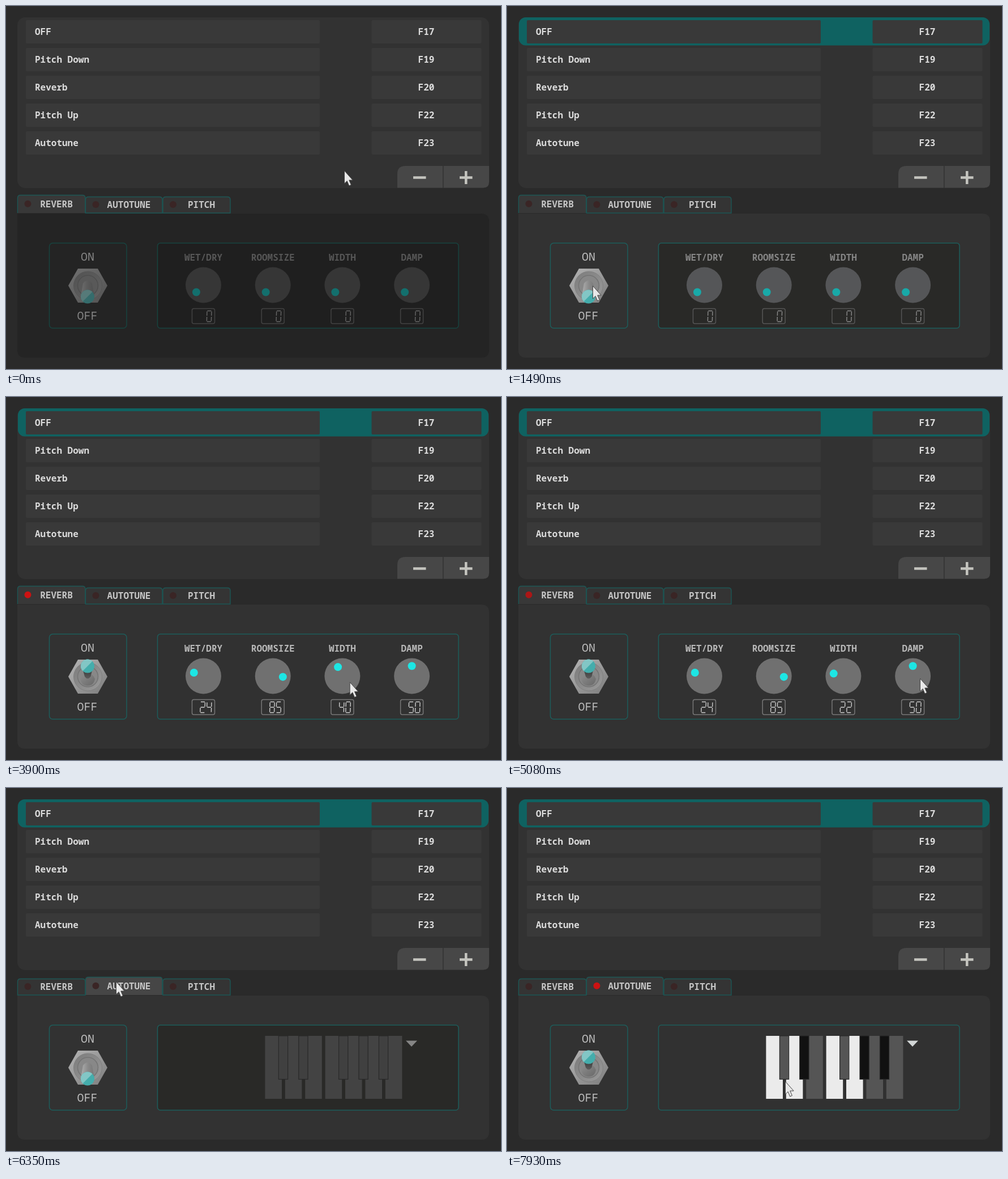
An HTML page for the animation above (8 s loop, 874 px wide and 640 px high).

```html
<!DOCTYPE html>
<html lang="en">
<head>
<meta charset="utf-8">
<title>Voice effects panel</title>
<style>
html, body { margin: 0; width: 100%; height: 100%; overflow: hidden; background: #2a2a2a; }
svg { display: block; width: 874px; height: 640px; font: 600 16px "Noto Sans Mono", "DejaVu Sans Mono", monospace; }
.dim  { --panel: #242424; --box: #1f1f1f; --line: #17433f; --label: #565656; --knob: #363636; --dot: #136f6d; --digit: #686868; --frame: #424242; --switch: #858585; --fade: .53; }
.idle { --panel: #323232; --box: #292927; --line: #1d5d5b; --label: #858585; --knob: #555658; --dot: #18a9a8; --digit: #8c8c8c; --frame: #555; --switch: #bdbdbd; --fade: 1; }
.on   { --panel: #323232; --box: #313131; --line: #1d5d5b; --label: #b8b8b8; --knob: #707070; --dot: #1de6e4; --digit: #d0d0d0; --frame: #777; --switch: #bdbdbd; --fade: 1; }
.panel { fill: var(--panel); }
.box { fill: var(--box); stroke: var(--line); stroke-width: 1.5; }
.switchBox { fill: var(--panel); }
.label { fill: var(--label); }
.knob { fill: var(--knob); }
.dot { fill: var(--dot); }
.digits { fill: none; stroke: var(--digit); stroke-width: 1.4; }
.frame { fill: none; stroke: var(--frame); stroke-width: 1.5; }
.big { font-size: 20px; font-weight: 500; fill: var(--switch); }
.toggle { opacity: var(--fade); }
.row { fill: #dcdcdc; }
.tabText { fill: #c6c6c6; }
</style>
</head>
<body>
<script>
const LOOP = 8000;
const NS = "http://www.w3.org/2000/svg";

function add(parent, tag, attrs = {}, text) {
  const el = document.createElementNS(NS, tag);
  set(el, attrs);
  if (text !== undefined) el.textContent = text;
  parent.append(el);
  return el;
}
function set(el, attrs) {
  for (const key in attrs) el.setAttribute(key, attrs[key]);
}
const rect = (parent, x, y, width, height, rx, attrs) =>
  add(parent, "rect", { x, y, width, height, rx, ...attrs });
const circle = (parent, cx, cy, r, attrs) => add(parent, "circle", { cx, cy, r, ...attrs });
const path = (parent, d, attrs) => add(parent, "path", { d, ...attrs });
const label = (parent, x, y, text, cls, anchor = "middle") =>
  add(parent, "text", { x, y, class: cls, "text-anchor": anchor }, text);
const show = (el, visible) => set(el, { visibility: visible ? "visible" : "hidden" });

const svg = add(document.body, "svg", { viewBox: "0 0 874 640" });
const defs = add(svg, "defs");
function gradient(id, x2, y2, ...colors) {
  const g = add(defs, "linearGradient", { id, x1: 0, y1: 0, x2, y2 });
  colors.forEach((c, i) => add(g, "stop", { offset: i / (colors.length - 1), "stop-color": c }));
}
gradient("nut", 1, 1, "#b4b4b4", "#999", "#7c7c7c");
gradient("ring", 1, 1, "#7c7c7c", "#9a9a9a");
gradient("stem", 1, 0, "#b0b0b0", "#8b8b8b", "#777");
gradient("neck", 0, 1, "#3c3c3c", "#5c5c5c");
gradient("dome", 1, 1, "#8e8e8e", "#686868");

// Preset list
rect(svg, 20, 20, 833, 301, 14, { fill: "#323232" });
const highlight = rect(svg, 21, 20, 831, 49.5, 12, { fill: "#0f6261" });
[["OFF", "F17"], ["Pitch Down", "F19"], ["Reverb", "F20"], ["Pitch Up", "F22"], ["Autotune", "F23"]]
  .forEach(([name, key], i) => {
    const y = 25 + 49 * i;
    rect(svg, 35, y, 519, 41, 2, { fill: "#393939" });
    rect(svg, 645.5, y, 194, 41, 2, { fill: "#393939" });
    label(svg, 51, y + 25.5, name, "row", "start");
    label(svg, 742, y + 25.5, key, "row");
  });
path(svg, "M691 320.500V296q0-14 14-14h66v38.500z", { fill: "#474747" });
path(svg, "M772.500 282H853v28q0 10.500-10 10.500h-70.500z", { fill: "#474747" });
path(svg, "M719 302.500h22.500M801 302.500h22.500M812.200 291v23", { stroke: "#c4c4be", "stroke-width": 4.5 });

// Effect panel
path(svg, "M20 366H839q14 0 14 14v226q0 14-14 14H34q-14 0-14-14z", { class: "panel" });
const tabs = [["REVERB", 20.5, 140, 89], ["AUTOTUNE", 140.5, 276, 217], ["PITCH", 277, 396, 345]]
  .map(([name, left, right, mid]) => {
    const shape = path(svg, "", { stroke: "#1c5755", "stroke-width": 1.4 });
    const led = circle(svg, left + 18, 349, 6);
    const text = label(svg, mid, 0, name, "tabText");
    return { left, right, shape, led, text };
  });

function drawTab(tab, selected, fill, ledColor) {
  const top = selected ? 333.5 : 336.5;
  const { left, right } = tab;
  set(tab.shape, {
    d: `M${left} 365V${top + 5}q0-5 5-5H${right - 5}q5 0 5 5V365${selected ? "" : "z"}`, fill
  });
  set(tab.led, { cy: selected ? 348.7 : 350, fill: ledColor });
  set(tab.text, { y: selected ? 355 : 356 });
}

// Toggle switch
rect(svg, 76.5, 418, 136.5, 150, 6, { class: "box switchBox" });
label(svg, 144, 449, "ON", "big");
label(svg, 143.5, 552.5, "OFF", "big");
const toggle = add(svg, "g", { class: "toggle" });
path(toggle, "M110 493L127 463H162L179 493 162 523H127z", { fill: "url(#nut)" });
circle(toggle, 144.5, 493, 25, { fill: "url(#ring)", stroke: "#808080" });
circle(toggle, 144.5, 493, 18, { fill: "#888", stroke: "#747474", "stroke-width": 1.5 });
function lever(cy, ...parts) {
  const g = add(toggle, "g");
  parts.forEach(([d, fill]) => path(g, d, { fill }));
  circle(g, 144, cy, 12, { fill: "#44adac" });
  path(g, `M135.5 ${cy + 8.5}A12 12 0 0 1 152.5 ${cy - 8.5}z`, { fill: "#83c6c5" });
  return g;
}
const leverDown = lever(512.5, ["M132 512L136 489Q144 479 152 489L156 512z", "url(#stem)"]);
const leverUp = lever(474.5,
  ["M131 497Q134 488 144 488T157 497Q155 509 144 509T131 497z", "url(#dome)"],
  ["M136 482L139 493Q144 500 149.5 493L152 482z", "url(#neck)"]);

// Reverb knobs
rect(svg, 267.5, 418, 531.5, 150, 5, { class: "box" });
const reverb = add(svg, "g");
const knobs = ["WET/DRY", "ROOMSIZE", "WIDTH", "DAMP"].map((name, i) => {
  const x = 348.5 + 122.7 * i;
  label(reverb, x, 449, name, "label");
  circle(reverb, x, 492, 31.5, { class: "knob" });
  rect(reverb, x - 20, 533.5, 40, 26.5, 3, { class: "frame" });
  return {
    x,
    dot: circle(reverb, 0, 0, 7, { class: "dot" }),
    digits: path(reverb, "", { class: "digits", transform: `translate(${x - 5.5} 537.5) skewX(-2)` })
  };
});

const SEGMENTS = {
  a: [1, 0, 8, 0], b: [8.5, 1, 8.5, 8.5], c: [8.5, 10.5, 8.5, 18], d: [1, 19, 8, 19],
  e: [.5, 10.5, .5, 18], f: [.5, 1, .5, 8.5], g: [1, 9.5, 8, 9.5]
};
const DIGITS = ["abcdef", "bc", "abged", "abgcd", "fgbc", "afgcd", "afgedc", "abc", "abcdefg", "abcdfg"];

function digitPath(value) {
  const chars = [...String(value)];
  return chars.map((ch, i) => [...DIGITS[ch]].map(s => {
    const [x1, y1, x2, y2] = SEGMENTS[s];
    const dx = 11.5 * (i + 2 - chars.length);
    return `M${x1 + dx} ${y1}L${x2 + dx} ${y2}`;
  }).join("")).join("");
}
function drawKnob(knob, value) {
  const angle = (value * 2.7 - 135) * Math.PI / 180;
  set(knob.dot, { cx: knob.x + 17.7 * Math.sin(angle), cy: 492 - 17.7 * Math.cos(angle) });
  set(knob.digits, { d: digitPath(Math.round(value)) });
}

// Autotune keyboard
const piano = add(svg, "g");
const keys = [];
for (let i = 0; i < 7; i++) {
  const el = rect(piano, 457.4 + 35.4 * i, 437, 29.6, 111, 0);
  keys.push({ el, off: "#434343", on: [0, 1, 3, 4].includes(i) ? "#ebebeb" : "#555" });
}
for (const i of [0, 1, 3, 4, 5]) {
  const el = rect(piano, 481.4 + 35.4 * i, 437, 16.2, 76.5, 0, { stroke: "#292929", "stroke-width": 1.2 });
  keys.push({ el, off: "#404040", on: [1, 4, 5].includes(i) ? "#111" : "#555" });
}
const arrow = path(piano, "M706 445.500H726L716 456z");

const cursor = path(svg, "M.5 .5V23L5.2 18.500 8.800 27 12.400 25.300 8.800 17H15.200z",
  { fill: "#e8e8e8", stroke: "#444", "stroke-width": 1, "stroke-linejoin": "round" });

// Motion tables: [time, ...values]
const CURSOR = [
  [100, 597, 290], [450, 601, 39], [890, 601, 39], [1490, 151, 493], [1800, 151, 493],
  [2060, 352, 492], [2380, 352, 518], [2600, 474, 493], [2670, 474, 493], [3080, 474, 455],
  [3340, 607, 492], [3410, 607, 492], [4650, 606, 522], [4800, 606, 522], [5080, 729, 496],
  [5140, 729, 496], [5460, 729, 474], [5800, 151, 498], [5900, 151, 498], [6230, 194, 341],
  [6390, 194, 341], [6730, 150, 500], [6960, 150, 500], [7500, 474, 520], [7650, 474, 520], [7900, 491, 517]
];
const VALUES = [
  [[2080, 50], [2380, 24]],
  [[2670, 50], [3080, 85]],
  [[3410, 50], [4650, 22]],
  [[5140, 50], [5460, 70]]
];
const CLICK = { preset: 500, reverbOn: 1720, reverbOff: 5850, autotuneTab: 6260, autotuneOn: 6800 };

function sample(steps, t) {
  const next = steps.findIndex(s => s[0] > t);
  if (next === 0) return steps[0].slice(1);
  if (next < 0) return steps[steps.length - 1].slice(1);
  const a = steps[next - 1], b = steps[next];
  const p = (t - a[0]) / (b[0] - a[0]);
  const eased = p * p * (3 - 2 * p);
  return a.slice(1).map((v, i) => v + (b[i + 1] - v) * eased);
}

function render(t) {
  const active = t >= CLICK.preset;
  const reverbOn = t >= CLICK.reverbOn && t < CLICK.reverbOff;
  const autotune = t >= CLICK.autotuneTab;
  const autotuneOn = t >= CLICK.autotuneOn;
  const on = reverbOn || autotuneOn;
  const [x, y] = sample(CURSOR, t);

  set(svg, { class: !active ? "dim" : on ? "on" : "idle" });
  show(highlight, active);
  show(leverUp, on);
  show(leverDown, !on);
  show(reverb, !autotune);
  show(piano, autotune);

  const hovered = y > 333 && y < 365;
  tabs.forEach((tab, i) => {
    const selected = i === (autotune ? 1 : 0);
    const lit = i === 0 ? reverbOn : i === 1 && autotuneOn;
    const hover = hovered && x >= tab.left && x < tab.right;
    const red = t > 4000 && reverbOn ? "#ac1616" : "#cc1212";
    drawTab(tab, selected, hover ? "#464646" : selected ? "#383838" : "#343434", lit ? red : "#3a2525");
  });
  knobs.forEach((knob, i) => drawKnob(knob, reverbOn ? sample(VALUES[i], t)[0] : 0));
  keys.forEach(key => set(key.el, { fill: autotuneOn ? key.on : key.off }));
  set(arrow, { fill: autotuneOn ? "#d2d6d6" : "#858585" });
  set(cursor, { transform: `translate(${x} ${y})` });
}

const start = performance.now();
function tick() {
  render((performance.now() - start) % LOOP);
  requestAnimationFrame(tick);
}
tick();
</script>
</body>
</html>
```
